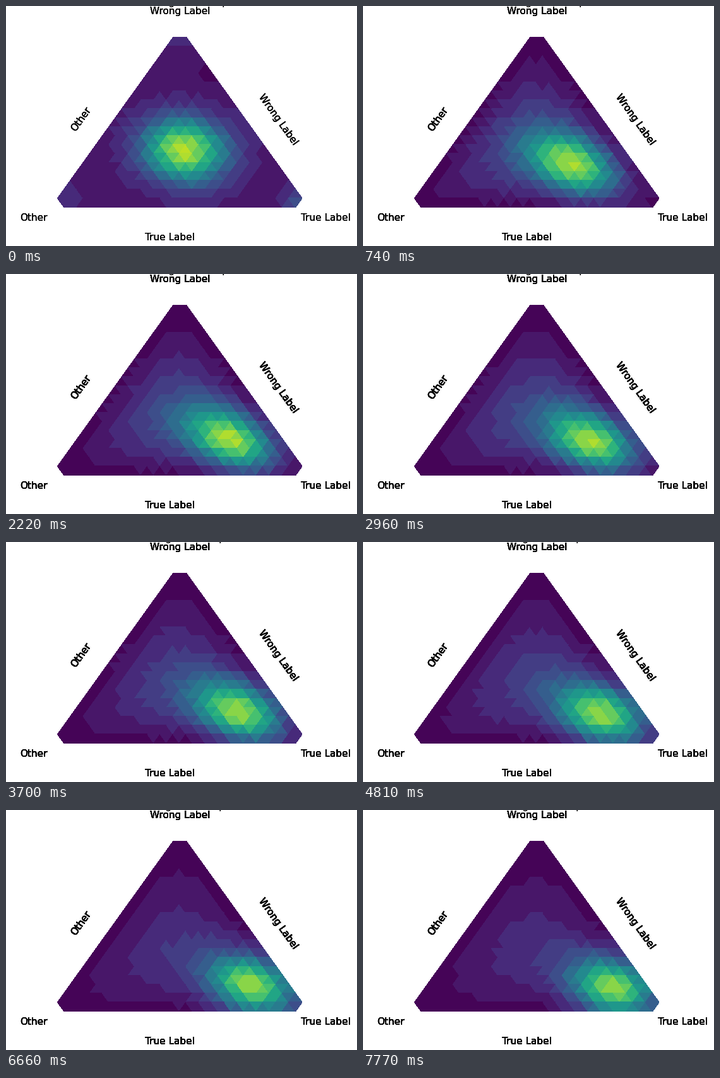
These frames come from a looping animation (556 px wide and 381 px high, 8000 ms). A matplotlib script:

```python
import numpy as np
import matplotlib.pyplot as plt
from matplotlib.animation import FuncAnimation
from matplotlib.collections import PolyCollection

W, H, DPI = 556, 381, 100
LOOP, TICK, HOLD = 8000, 40, 370
N = 20                                   # rows of cells
APEX = np.array([275.3, 35.8])
CELL_W, CELL_H = 20.33, 14.18
LEVELS = 17
COPIES = 8

plt.rcParams["font.family"] = "DejaVu Sans"


def make_cells():
    """Triangular cells of a ternary grid without its three corners."""
    cells = []
    for r in range(N):
        top, bottom = APEX[1] + r * CELL_H, APEX[1] + (r + 1) * CELL_H
        left = APEX[0] - (r + 1) * CELL_W / 2
        for i in range(r + 1):
            x = left + i * CELL_W
            corner = r == 0 or (r == N - 1 and i in (0, r))
            if not corner:
                cells.append([(x, bottom), (x + CELL_W, bottom),
                              (x + CELL_W / 2, top)])
            if i < r:
                cells.append([(x + CELL_W / 2, top), (x + CELL_W * 1.5, top),
                              (x + CELL_W, bottom)])
    return np.array(cells)


cells = make_cells()
X, Y = cells.mean(axis=1).T

# Product of the barycentric weights, 1 in the middle and 0 on the sides
wt = 1 - (Y - APEX[1]) / (N * CELL_H)
wr = (X - APEX[0]) / (N * CELL_W) + (1 - wt) / 2
inner = 27 * wt * wr * (1 - wt - wr)


def bump(x, y, sx, sy, rho=0.0):
    u, v = (X - x) / sx, (Y - y) / sy
    return np.exp(-(u * u + v * v - 2 * rho * u * v) / (2 * (1 - rho ** 2)))


# Before training: a flat floor with raised corners
start = (0.06 + 0.09 * bump(102, 306, 15, 13) + 0.09 * bump(275, 56, 14, 9)
         + 0.15 * bump(462, 308, 19, 16) - 0.04 * bump(318, 108, 22, 24))


def density(epoch):
    early = np.exp(-1.5 * epoch)
    travel = epoch ** 0.37               # fast at first, then ever slower
    spread = ((0.24 - 0.006 * epoch) * inner ** 1.15
              + (0.06 - 0.0015 * epoch) * bump(308, 230, 42, 32))
    rest = early * start + (1 - early) * spread
    core = bump(284 + 36.4 * travel, 229 + 17 * travel, 46, 32 + 3 * early,
                0.45 - 0.01 * epoch - 0.37 * early)
    noise = np.random.default_rng(epoch + 5).normal(0, 0.015, len(X))
    peak = 0.89 - 0.0025 * epoch
    v = (rest + (peak - rest) * core) * (1 + noise)
    return np.clip(np.round(v * LEVELS) / LEVELS, 0.01, 0.9)


fig = plt.figure(figsize=(W / DPI, H / DPI), dpi=DPI, facecolor="white")
ax = fig.add_axes([0, 0, 1, 1])
ax.set_xlim(0, W)
ax.set_ylim(H, 0)
ax.axis("off")

heat = PolyCollection(cells, cmap="viridis", edgecolors="face",
                      linewidths=0.7, antialiaseds=False)
heat.set_clim(0, 1)
ax.add_collection(heat)

title = ax.text(272.5, -1.7, "", size=12, ha="center", va="baseline")

LABELS = [
    ("Wrong Label", 275.5, 13, 0, "baseline"),
    ("Other", 43.6, 341.3, 0, "baseline"),
    ("True Label", 506.3, 341.3, 0, "baseline"),
    ("True Label", 259.3, 372, 0, "baseline"),
    ("Other", 119.6, 179.8, 54.4, "center"),
    ("Wrong Label", 430.7, 180, -54.4, "center"),
]
# Labels are printed over themselves once more per epoch, which thickens them
layers = [[ax.text(x, y, s, size=11, rotation=a, ha="center", va=va)
           for s, x, y, a, va in LABELS] for _ in range(COPIES)]


def update(n):
    epoch = (n * TICK + TICK // 2) // HOLD
    heat.set_array(density(epoch))
    title.set_text(f"Model Training Labels Epoch {epoch}")
    for i, layer in enumerate(layers):
        for t in layer:
            t.set_visible(i < epoch + 3)
    return [heat, title]


anim = FuncAnimation(fig, update, frames=LOOP // TICK, interval=TICK,
                     repeat=True, repeat_delay=0, blit=False)
plt.show()
```
